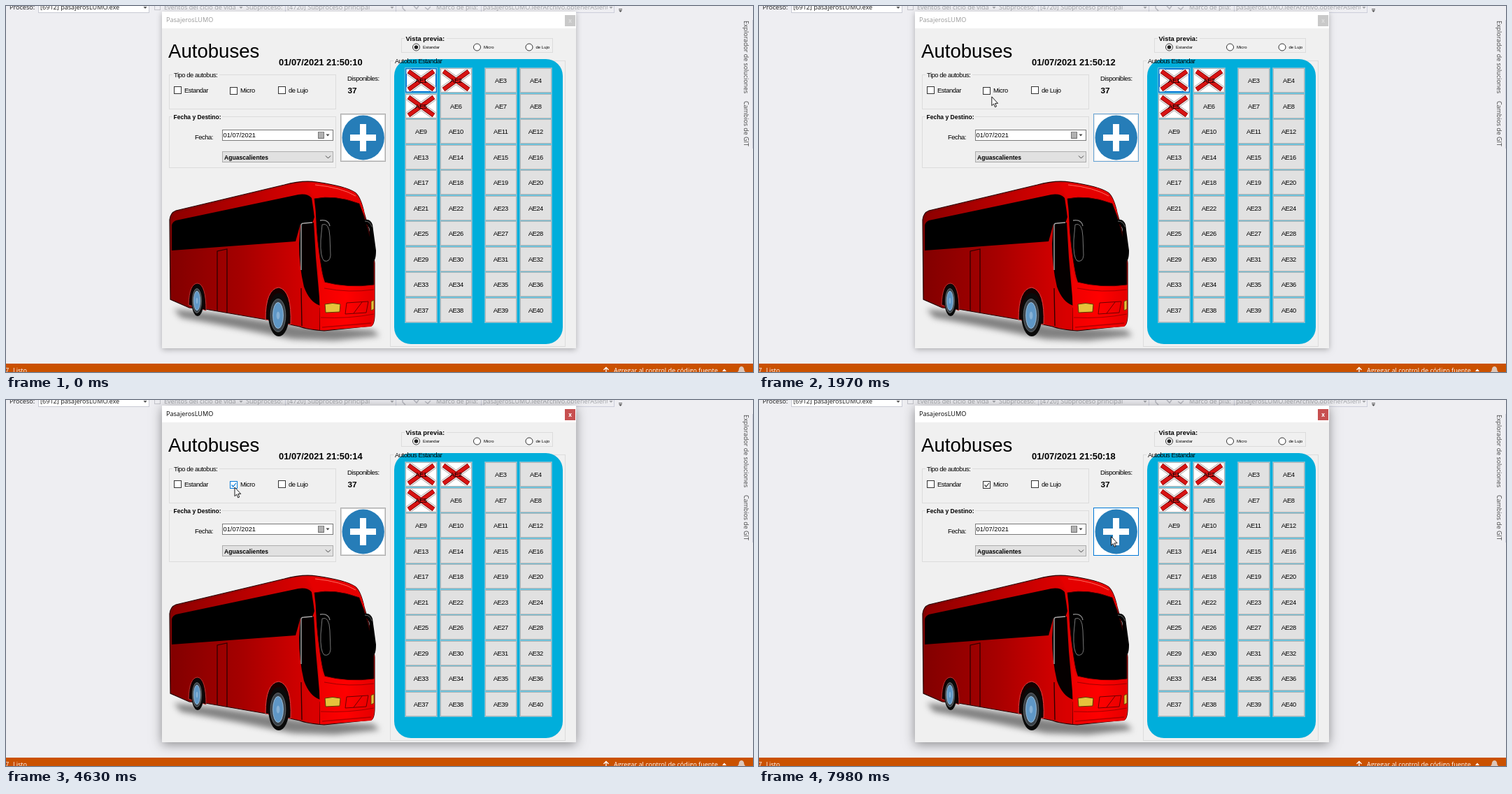
Write an HTML page with a canvas that moves like this. It is 1068 px wide and 524 px high and loops after 8000 ms.

```html
<!DOCTYPE html>
<html lang="es">
<head>
<meta charset="utf-8">
<style>
html, body { margin: 0; width: 100%; height: 100%; overflow: hidden; background: #eeeef2; }
canvas { display: block; }
</style>
</head>
<body>
<canvas id="stage" width="1068" height="524"></canvas>
<script>
const ctx = document.getElementById('stage').getContext('2d');
const LOOP = 8000, BLUE = '#0078d7', FACE = '#f0f0f0';
const SANS = '"Liberation Sans", Arial, sans-serif';
const UI = '"Open Sans", "Noto Sans", sans-serif';

// Runs of picture updates: start, end, count
const runs = [
  [0, 0, 1], [550, 1350, 12], [1420, 2220, 13], [2290, 2650, 6], [2790, 2910, 3],
  [3910, 4040, 3], [4310, 4310, 1], [4630, 4630, 1], [4890, 4890, 1],
  [5160, 5910, 12], [5970, 6650, 11], [6980, 6980, 1], [7980, 7980, 1]
];
const ticks = [870, 1880, 2850, 3910, 4890, 5970, 6980, 7980];
// Pointer path: time, x, y
const path = [
  [550, 1056, 506], [700, 860, 350], [850, 735, 265], [930, 680, 250], [1060, 645, 260],
  [1250, 628, 240], [1350, 621.5, 225], [1420, 612, 222], [1620, 520, 190], [1800, 385, 150],
  [1950, 332.5, 129.5], [2220, 317, 123], [2290, 316, 122], [2650, 320, 122], [2910, 324, 122],
  [3910, 324, 122], [4040, 325, 122], [4310, 326, 123], [4630, 326.5, 124.5],
  [5100, 326.5, 124.5], [5350, 335, 185], [5550, 350, 249], [5720, 400, 240],
  [5910, 455, 212], [5990, 466, 209], [6174, 496, 197], [6240, 496, 197], [6650, 503, 195]
];

function snap(t) {
  const [a, b, n] = runs.filter(r => r[0] <= t).pop();
  if (n < 2 || t >= b) return b;
  const step = (b - a) / (n - 1);
  return a + Math.floor((t - a) / step) * step;
}

function pointer(t) {
  if (t < path[0][0]) return null;
  const i = path.findIndex(k => k[0] > t);
  if (i < 0) return path[path.length - 1].slice(1);
  const a = path[i - 1], b = path[i], u = (t - a[0]) / (b[0] - a[0]);
  return [a[1] + (b[1] - a[1]) * u, a[2] + (b[2] - a[2]) * u];
}

// 1 while the pointer is inside, then fading out
function hover(t, x, y, w, h) {
  for (let d = 0; d < 400; d += 20) {
    const p = pointer(t - d);
    if (p && p[0] >= x && p[0] < x + w && p[1] >= y && p[1] < y + h) return 1 - (d / 400) ** 2;
  }
  return 0;
}

function text(s, x, y, font, color = '#000', align = 'left', gap = 0) {
  ctx.font = font;
  ctx.fillStyle = color;
  ctx.textAlign = align;
  ctx.letterSpacing = gap + 'px';
  ctx.fillText(s, x, y);
}
const label = (s, x, y, align) => text(s, x, y, '9.4px ' + SANS, '#000', align, -0.45);
const bold = (s, x, y, size) => text(s, x, y, `bold ${size}px ${SANS}`);
const ui = (s, x, y, color, size = 9.1) => text(s, x, y, `${size}px ${UI}`, color);

function box(x, y, w, h, fill, line) {
  if (fill) { ctx.fillStyle = fill; ctx.fillRect(x, y, w, h); }
  if (line) { ctx.strokeStyle = line; ctx.lineWidth = 1; ctx.strokeRect(x + .5, y + .5, w - 1, h - 1); }
}

function shape(d, fill, line, width = 1) {
  const p = new Path2D(d);
  if (fill) { ctx.fillStyle = fill; ctx.fill(p); }
  if (line) { ctx.strokeStyle = line; ctx.lineWidth = width; ctx.stroke(p); }
}

function oval(x, y, rx, ry, fill, line, width = 1, turn = 0) {
  ctx.beginPath();
  ctx.ellipse(x, y, rx, ry, turn, 0, 7);
  if (fill) { ctx.fillStyle = fill; ctx.fill(); }
  if (line) { ctx.strokeStyle = line; ctx.lineWidth = width; ctx.stroke(); }
}

function ramp(x0, x1, ...colors) {
  const g = ctx.createLinearGradient(x0, 0, x1, 0);
  colors.forEach((c, i) => g.addColorStop(i / (colors.length - 1), c));
  return g;
}

const caret = (x, y, color) => shape(`M${x - 2.5} ${y}h5l-2.5 3z`, color);

function ide() {
  box(0, 0, 1068, 524, '#eeeef2');
  ui('Proceso:', 5, 5, '#1e1e1e');
  box(46, -5, 159, 15, '#fff', '#c8cad4');
  ui('[6912] pasajerosLUMO.exe', 49, 5, '#1e1e1e');
  caret(199, 1, '#555');
  const dim = '#a2a4a8';
  box(212, -5, 9, 11, null, '#c3c4ca');
  ui('Eventos del ciclo de vida', 226, 5, dim);
  caret(336, 1, dim);
  ui('Subproceso:', 343, 5, dim);
  box(399, -5, 159, 15, null, '#cccedb');
  ui('[4720] Subproceso principal', 402, 5, dim);
  caret(552, 1, dim);
  shape('M567 0v3l4 4M583 0l4 4 3-4M599 2l4 3 4-4', null, '#b9bac2', 1.5);
  ui('Marco de pila:', 615, 5, dim);
  box(679, -5, 191, 15, null, '#cccedb');
  ctx.save();
  ctx.beginPath();
  ctx.rect(680, 0, 180, 10);
  ctx.clip();
  ui('pasajerosLUMO.leerArchivo.obtenerAsiento', 682, 5, dim);
  ctx.restore();
  caret(865, 1, dim);
  box(876, 4, 5, 1, '#555');
  caret(878.5, 6, '#555');

  [['Explorador de soluciones', 21], ['Cambios de GIT', 136]].forEach(([s, y]) => {
    ctx.save();
    ctx.translate(1055, y);
    ctx.rotate(Math.PI / 2);
    ui(s, 0, 0, '#444', 8.9);
    ctx.restore();
  });
  box(1067, 20, 1, 184, '#cccedb');

  box(0, 512, 1068, 12, '#ca5100');
  ui('7', -1, 525, '#fff');
  ui('Listo', 10, 525, '#fff');
  shape('M858 524v-6m-3.500 3l3.500-3.500 3.500 3.500', null, '#fff', 1.3);
  ui('Agregar al control de código fuente', 869, 525, '#fff');
  shape('M1024 523l3-3.500 3 3.500z', '#fff');
  shape('M1046 524q2-2 2-5 1-3 3.500-3 2.500 0 3.500 3 0 3 2 5z', '#dcc7ba');
}

function frame(active) {
  ctx.save();
  ctx.shadowColor = active ? 'rgba(0,0,0,.42)' : 'rgba(0,0,0,.28)';
  ctx.shadowBlur = active ? 15 : 8;
  ctx.shadowOffsetY = active ? 3 : 2;
  box(223, 8, 592, 482, FACE);
  ctx.restore();
  box(223, 8, 592, 24, '#fff');
  ui('PasajerosLUMO', 229, 23, active ? '#000' : '#999');
  box(799, 13, 15, 16, active ? '#c75050' : '#c9c9c9');
  text('x', 806.5, 23.5, 'bold 8px ' + UI, active ? '#fff' : '#dedede', 'center');
}

function group(x, y, w, h, gapX, gapW) {
  box(x, y, w, h, null, '#dcdcdc');
  box(gapX, y - 1, gapW, 3, FACE);
}

function check(x, y, s, line = '#333', fill = '#fff', on = false) {
  box(x, y, 11, 11, fill, line);
  if (on) shape(`M${x + 2.5} ${y + 5.5}l2.300 2.500 4-5`, null, line, 1.2);
  label(s, x + 15, 124);
}

function radio(x, s, on) {
  oval(x, 59, 5, 5, '#fff', '#333');
  if (on) oval(x, 59, 2.8, 2.8, '#222');
  text(s, x + 9.5, 61.3, '6px ' + SANS);
}

function form(t, p) {
  text('Autobuses', 232, 74, '27.6px ' + SANS);
  bold('01/07/2021 21:50:' + (10 + ticks.filter(k => k <= t).length), 390, 85, 12.9);

  group(233, 98, 239, 50, 238, 67);
  label('Tipo de autobus:', 240, 102);
  const over = p && p[0] >= 319 && p[0] < 357 && p[1] >= 115 && p[1] < 128;
  const pressed = t >= 3910 && t < 3970;
  check(240, 115, 'Estandar');
  check(320, 116, 'Micro', over ? BLUE : '#333', pressed ? '#cce4f7' : '#fff', t >= 3970);
  check(389, 115, 'de Lujo');

  group(233, 158, 239, 74, 238, 71);
  bold('Fecha y Destino:', 239.5, 161.5, 8.5);
  label('Fecha:', 270, 191);
  const inDate = p && p[0] >= 309 && p[0] < 468 && p[1] >= 177 && p[1] < 193;
  box(309, 177, 159, 16, '#fff', inDate ? '#171717' : '#7a7a7a');
  text('01/07/2021', 310.5, 188, '9.3px ' + SANS);
  box(446, 180, 9, 10, '#c9c9c9', '#777');
  for (let y = 182; y < 189; y += 2) box(447, y, 7, 1, '#999');
  caret(460, 183.5, '#444');

  const warm = hover(t, 309, 208, 159, 16);
  box(309, 208, 159, 16, '#e1e1e1', '#adadad');
  ctx.globalAlpha = warm;
  box(309, 208, 159, 16, '#e5f1fb', BLUE);
  ctx.globalAlpha = 1;
  bold('Aguascalientes', 312, 219.5, 8.6);
  shape('M457 214.500l3.500 3.500 3.500-3.500', null, '#444');

  label('Disponibles:', 488, 107);
  bold('37', 488.5, 125, 11.8);

  box(478, 154, 65, 69, '#fff', '#adadad');
  box(479, 155, 63, 67, null, '#d5d5d5');
  ctx.globalAlpha = hover(t, 478, 154, 65, 69);
  box(478, 154, 65, 69, '#fff', BLUE);
  ctx.globalAlpha = 1;
  oval(510.7, 188.5, 30.2, 32, '#267db8');
  box(492, 184, 37, 9, '#fff');
  box(506, 169, 9, 39, '#fff');

  group(565, 46, 217, 21, 570, 60);
  bold('Vista previa:', 571.5, 50, 9.4);
  radio(586.5, 'Estandar', true);
  radio(673.5, 'Micro');
  radio(748, 'de Lujo');
}

function cross(x, y) {
  ctx.save();
  ctx.beginPath();
  ctx.rect(x - 21, y - 16, 42, 32);
  ctx.clip();
  const d = `M${x - 18} ${y - 13}L${x + 18} ${y + 13}M${x + 18} ${y - 13}L${x - 18} ${y + 13}`;
  ctx.lineCap = 'round';
  shape(d, null, '#9b8f8f', 10.5);
  shape(d, null, '#fff', 9);
  ctx.lineCap = 'butt';
  shape(d, null, '#7d0f0f', 6.5);
  shape(d, null, '#d81313', 5);
  ctx.restore();
}

function seats(t, active) {
  group(549, 78, 251, 410, 554, 70);
  ctx.fillStyle = '#00aedb';
  ctx.beginPath();
  ctx.roundRect(555, 76, 241, 408, 24);
  ctx.fill();
  label('Autobus Estandar', 556, 82);
  const cols = [571, 621, 685, 735];
  for (let i = 0; i < 40; i++) {
    const x = cols[i % 4], y = 89 + Math.round(Math.floor(i / 4) * 36.5), n = i + 1;
    const sold = n === 1 || n === 2 || n === 5;
    box(x - 1, y - 1, 47, 37, '#6fc3dc');
    box(x, y, 45, 35, sold ? '#fff' : '#e1e1e1', n === 1 && !active ? BLUE : '#b4b4b4');
    if (n === 1 && !active) box(x + 1, y + 1, 43, 33, null, BLUE);
    ctx.globalAlpha = hover(t, x, y, 45, 35);
    box(x, y, 45, 35, '#e5f1fb', BLUE);
    ctx.globalAlpha = 1;
    if (sold) cross(x + 22.5, y + 17.5);
    label('AE' + n, x + 22.3, y + 20.5, 'center');
  }
}

function wheel(x, y, rx, ry) {
  oval(x + 1, y, rx, ry, '#0a0a0a');
  oval(x, y + 1, rx * .72, ry * .76, '#39424a', '#777', .8);
  oval(x, y + 1, rx * .5, ry * .6, '#5f97c6', '#a9c7df', .8);
  oval(x, y + 1, rx * .16, ry * .18, '#87b2d6');
}

function bus() {
  ctx.save();
  ctx.filter = 'blur(4px)';
  shape('M240 434L300 440 420 458 525 464 534 472 470 479 410 477 330 461 250 446z', 'rgba(60,60,60,.62)');
  ctx.restore();

  // Side and roof
  shape('M234 306Q235 296 243 293L398 256Q424 249 444 252 486 258 499 267 507 273 512 296 524 335 527 368L527 440Q527 456 522 458L455 465Q430 463 420 459L372 449 285 434 262 432 235 420z',
    ramp(234, 440, '#820000', '#a50000', '#d90000'), '#250000', 1.2);
  shape('M241 297L400 258Q425 252 437 254L441 268 419 270 240 309 236 312z', ramp(236, 440, '#8c0000', '#b60000', '#e00000'));
  shape('M438 253Q482 257 499 267 507 274 511 292L441 275 430 256z', '#e50000');
  shape('M442 256Q480 260 500 272', null, '#ff6b5e', 1);

  // Side windows
  shape('M237 314Q238 309 243 307L418 270Q431 268 437 275L441 302 438 311 421 312 414 337 237 350z', '#000');
  // Front door glass
  shape('M421 312L440 310 443 360 449 429Q434 424 426 402 419 373 419 340z', '#050000');
  shape('M422 404L423 458M449 432V464', null, '#2b0000', 1.3);
  shape('M422 378V314Q422 311 426 311L438 310', null, '#aaa', 1.4);

  // Front
  shape('M443 290Q448 370 449 464L522 459Q527 456 527 440V368L511 290z', ramp(446, 527, '#ee0000', '#ff0000', '#e40000'));
  shape('M441 276Q470 270 505 283 520 318 526 360L526 399Q490 404 455 395 445 350 441 276z', '#000', '#3d0000', 1);
  shape('M430 256Q441 270 442 302 444 370 455 396', null, '#e00000', 2.2);
  shape('M455 404Q490 411 526 406M450 446Q490 448 526 441', null, '#a10000', 1);
  shape('M456 427Q467 424 478 427L477 438 457 439z', '#e6c23b', '#5b3b00', 1);
  shape('M522 423L526 421V434L522 436z', '#e6c23b', '#5b3b00', .8);
  shape('M487 425L518 423 515 439 485 441zM497 440L509 424', null, '#6c0000', 1);
  shape('M452 460L522 454', null, '#b00000', 1.4);

  // Mirrors
  shape('M449 307Q461 305 463 315', null, '#888', 1.3);
  shape('M452 313Q462 309 463 330L464 357Q463 367 455 365 449 360 450 335z', '#000', '#777', 1);
  shape('M511 307Q520 303 524 313L529 350Q529 366 524 365 518 345 520 322 519 312 512 311z', '#000');
  shape('M513 308Q521 308 523 316', null, '#888', .8);

  // Passenger door
  shape('M302 437V351L316 348V439', null, '#2a0000', 1.2);

  // Wheels
  shape('M261 428Q262 397 274 397 286 399 286 436z', '#170000', '#d04040', .8);
  wheel(273, 421, 9, 23);
  shape('M371 449Q371 405 390 403 409 407 407 456z', '#170000', '#e04040', 1);
  wheel(389, 442, 15, 31);
}

function cursor([x, y]) {
  ctx.save();
  ctx.translate(x, y);
  ctx.lineJoin = 'miter';
  shape('M.5 .5V13.200L3.300 10.600 5.200 15.300 7.200 14.400 5.300 9.900H9.200z', '#fff', '#000', .9);
  ctx.restore();
}

function draw(now) {
  const t = snap(now % LOOP), p = pointer(t), active = t >= 3910;
  ide();
  frame(active);
  bus();
  form(t, p);
  seats(t, active);
  if (p) cursor(p);
}

let start;
function loop(now) {
  start ??= now;
  draw(now - start);
  requestAnimationFrame(loop);
}
requestAnimationFrame(loop);
</script>
</body>
</html>
```
